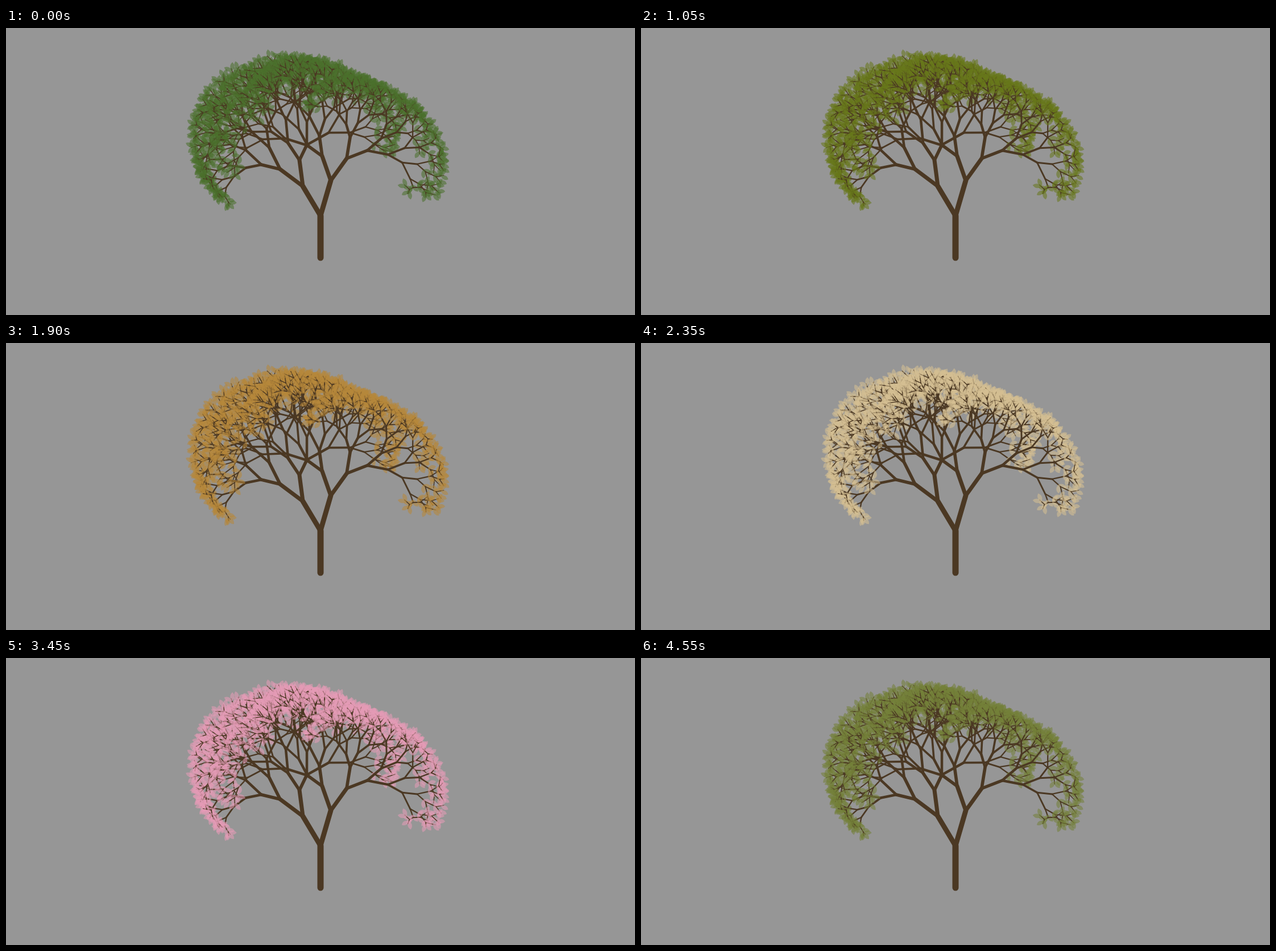
These frames come from a looping animation (1106 px wide and 506 px high, 4600 ms). An HTML page with a canvas:

```html
<!DOCTYPE html>
<html lang="en">
<head>
<meta charset="utf-8">
<title>Tree through the seasons</title>
<style>
html, body { margin: 0; width: 100%; height: 100%; overflow: hidden; background: #969696; }
canvas { display: block; }
</style>
</head>
<body>
<canvas id="stage" width="1106" height="506"></canvas>
<script>
const ctx = document.getElementById('stage').getContext('2d');
const { sin, cos, atan2, hypot, min, max, PI } = Math;
const LOOP = 4600, STEP = 50, HOLD = 750;
const BARK = '#4b3823', SKY = '#969696', LEAF_ALPHA = 0.56;
const LIMB_LEVELS = 3, TIP_LEVEL = 9, LEAFY_LEVEL = 7;
const CENTRE = { x: 550, y: 220 };

// Ends of the main limbs, level by level, left child first.
const LIMBS = [
  [522, 279], [571, 269],
  [482, 249], [516, 233], [556, 226], [599, 230],
  [449, 241], [463, 211], [496, 203], [529, 206], [530, 207], [551, 190], [605, 193], [635, 216]
];

const RESTING = [75, 112, 45];
const SEASONS = [
  { at: 750, rgb: [70, 116, 26] },
  { at: 1350, rgb: [138, 122, 28] },
  { at: 1900, rgb: [181, 136, 58] },
  { at: 2700, rgb: [238, 232, 214] },
  { at: 3000, rgb: [231, 163, 188] },
  { at: 3450, rgb: [229, 155, 181] },
  { at: 4550, rgb: [116, 128, 57] }
];

let seed = 20417;
function rnd() {
  seed = (seed + 0x6D2B79F5) | 0;
  let v = Math.imul(seed ^ (seed >>> 15), 1 | seed);
  v = (v + Math.imul(v ^ (v >>> 7), 61 | v)) ^ v;
  return ((v ^ (v >>> 14)) >>> 0) / 4294967296;
}
const jitter = amount => (rnd() - 0.5) * amount;
const ahead = (x, y, angle, len) => [x + cos(angle) * len, y + sin(angle) * len];

// Crown outline in polar form around CENTRE, angles counted upwards from the right.
const crownEdge = angle => 198 + 37.5 * cos(2 * angle + 0.73);

function polar(x, y) {
  let angle = atan2(CENTRE.y - y, x - CENTRE.x);
  if (angle < -PI / 2) angle += 2 * PI;
  return { angle, r: hypot(x - CENTRE.x, y - CENTRE.y) };
}

function inCrown(x, y) {
  const { angle, r } = polar(x, y);
  const edge = crownEdge(angle);
  const inner = angle > 0 && angle < PI ? 0.45 : 0.62;
  return angle > -0.36 && angle < 3.65 && r > inner * edge && r < edge - 9;
}

// Parts are kept in paint order, so later limbs cover earlier leaves.
const parts = [];

function addBranch(x1, y1, x2, y2, level) {
  const path = new Path2D();
  path.moveTo(x1, y1);
  path.lineTo(x2, y2);
  parts.push({ path, width: 11 * 0.8 ** level });
}

function addLeaf(x, y, angle) {
  const len = 15 + jitter(2);
  const path = new Path2D();
  const tip = ahead(x, y, angle, len);
  const middle = ahead(x, y, angle, len * 0.55);
  path.moveTo(x, y);
  path.quadraticCurveTo(...ahead(...middle, angle + PI / 2, 7.5), ...tip);
  path.quadraticCurveTo(...ahead(...middle, angle - PI / 2, 7.5), x, y);
  parts.push({ path });
}

// How far twigs may stretch to fill the crown along this heading.
function reach(x, y, angle) {
  const room = crownEdge(polar(...ahead(x, y, angle, 130)).angle) - polar(x, y).r;
  return min(1.25, max(0.8, room / 115));
}

function sprout(x, y, heading, level, scale) {
  for (const side of [-1, 1]) {
    const size = 32 * 0.83 ** (level - LIMB_LEVELS - 1);
    let angle, end, stretch;
    for (let k = 0; k < 14; k++) {
      angle = heading + side * 0.47 + jitter(0.36 + 0.15 * k);
      stretch = scale || reach(x, y, angle);
      end = ahead(x, y, angle, size * stretch * (0.8 + rnd() * 0.4) * (1 - 0.04 * k));
      if (level < LEAFY_LEVEL || inCrown(...end)) break;
    }
    addBranch(x, y, ...end, level);
    if (level >= LEAFY_LEVEL) {
      const base = ahead(...end, angle, -5);
      for (const fan of [-0.6, 0.6]) addLeaf(...base, angle + fan + jitter(0.5));
    }
    if (level < TIP_LEVEL) sprout(...end, angle, level + 1, stretch);
  }
}

// Limbs are numbered as a binary heap whose root is the trunk.
function grow(node, px, py, level) {
  const [x, y] = LIMBS[node - 2];
  addBranch(px, py, x, y, level);
  if (level === LIMB_LEVELS) {
    sprout(x, y, atan2(y - py, x - px), level + 1);
  } else {
    grow(node * 2, x, y, level + 1);
    grow(node * 2 + 1, x, y, level + 1);
  }
}

addBranch(553, 405, 553, 331, 0);
grow(2, 553, 331, 1);
grow(3, 553, 331, 1);

function leafColour(t) {
  if (t < HOLD) return RESTING;
  const next = max(1, SEASONS.findIndex(s => s.at >= t));
  const a = SEASONS[next - 1], b = SEASONS[next];
  const p = (t - a.at) / (b.at - a.at);
  return a.rgb.map((v, i) => Math.round(v + (b.rgb[i] - v) * p));
}

function draw(t) {
  ctx.globalAlpha = 1;
  ctx.fillStyle = SKY;
  ctx.fillRect(0, 0, 1106, 506);
  ctx.strokeStyle = BARK;
  ctx.lineCap = 'round';
  ctx.fillStyle = `rgb(${leafColour(t)})`;
  for (const { path, width } of parts) {
    ctx.globalAlpha = width ? 1 : LEAF_ALPHA;
    if (width) {
      ctx.lineWidth = width;
      ctx.stroke(path);
    } else {
      ctx.fill(path);
    }
  }
}

const start = performance.now();
let shown = -1;
function tick() {
  const t = (performance.now() - start) % LOOP;
  const step = t < HOLD ? 0 : Math.floor(t / STEP) * STEP;
  if (step !== shown) {
    shown = step;
    draw(step);
  }
  requestAnimationFrame(tick);
}
tick();
</script>
</body>
</html>
```
